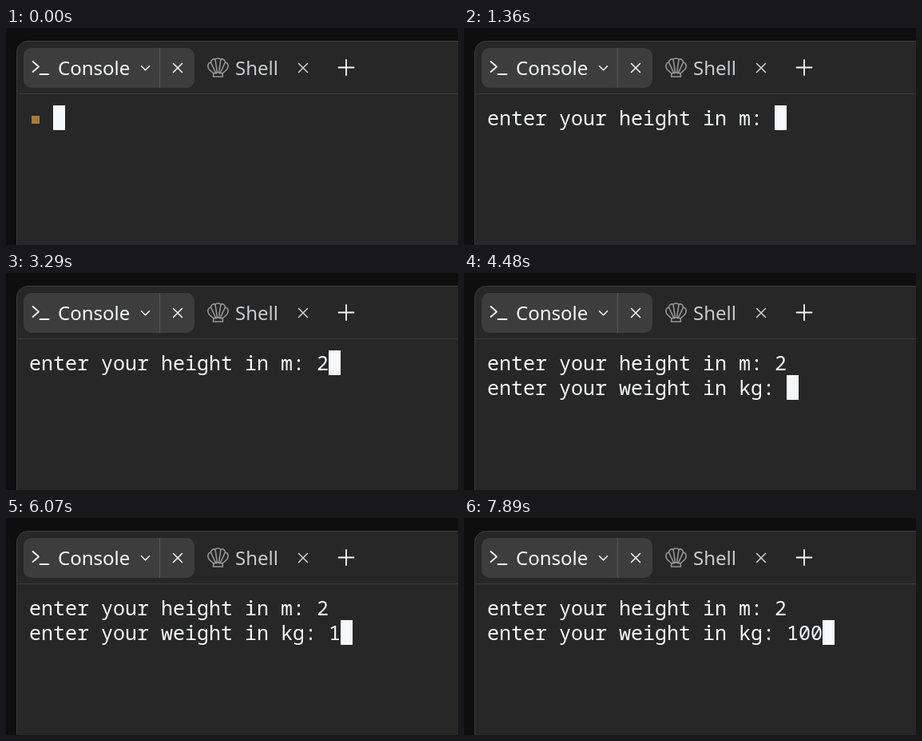
Animation of 566x272 px, one loop 8000 ms. Source, as an HTML page:

```html
<!DOCTYPE html>
<html lang="en">
<head>
<meta charset="utf-8">
<title>Console</title>
<style>
  html, body { margin: 0; width: 100%; height: 100%; overflow: hidden; background: #0e0e0e; }
  svg { display: block; }
  .tab { font: 24px "Noto Sans", "Open Sans", sans-serif; }
  .term { font: 25px "Noto Sans Mono", "DejaVu Sans Mono", monospace; fill: #f5f9fc; white-space: pre; }
  .line { fill: none; stroke-linecap: round; stroke-linejoin: round; }
</style>
</head>
<body>
<svg width="566" height="272" viewBox="0 0 566 272">
  <rect x="13.5" y="16.5" width="580" height="300" rx="14" fill="#272727" stroke="#3c3c3c"/>
  <path d="M14 82.5H566" stroke="#3b3b3b"/>

  <rect x="22" y="25" width="214" height="50" rx="10" fill="#3d3d3d"/>
  <path d="M192.5 25V75" stroke="#545454"/>
  <g class="line" stroke="#f5f9fc" stroke-width="1.8">
    <path d="M33.5 42L41 48.5L33.5 55M42.5 58H53.5"/>
    <path d="M169.5 47.8L174.5 52.8L179.5 47.8" stroke-width="1.5"/>
    <path d="M209.5 44.5L220.5 55.5M220.5 44.5L209.5 55.5" stroke-width="1.5"/>
    <path d="M416.5 49.5H435.5M426 40V59"/>
  </g>
  <path class="line" d="M366.500 44.500L377.500 55.500M377.500 44.500L366.500 55.500" stroke="#d0d3d6" stroke-width="1.5"/>
  <text class="tab" x="65" y="59" fill="#f5f9fc">Console</text>
  <text class="tab" x="287" y="59" fill="#c8ccd0">Shell</text>

  <g class="line" stroke="#979797" stroke-width="1.6">
    <path d="M260 57L254.500 52C251.500 48 253 43.500 256.500 43C257 39.500 260 38 262 39.500C263.500 37.500 267.500 37.500 269 39.500C271.500 38 274 39.500 274.500 43C278 43.500 279.500 48 276.500 52L271 57"/>
    <path d="M256.500 43L263 57M262 39.500L264.500 56M269 39.500L266.500 56M274.500 43L268 57"/>
    <path d="M260 57L259.500 61H271.500L271 57C268 55.500 263 55.500 260 57Z"/>
  </g>

  <rect id="prompt" x="32" y="110" width="10" height="10" fill="#a97b38"/>
  <text class="term" x="29" y="122" id="row0"></text>
  <text class="term" x="29" y="153" id="row1"></text>
  <rect id="cursor" width="15" height="31" fill="#f5f9fc"/>
</svg>
<script>
  const LOOP = 8000, CELL = 15, ROW = 31, LEFT = 29, TOP = 97;
  const HEIGHT = "enter your height in m: ";
  const WEIGHT = "enter your weight in kg: ";
  const $ = id => document.getElementById(id);
  const prompt = $("prompt"), cursor = $("cursor"), rows = [$("row0"), $("row1")];

  // Each step: start time, then the terminal lines; the cursor follows the last one.
  const steps = [
    [0, "  "],
    [1290, ""],
    [1360, HEIGHT],
    [3290, HEIGHT + "2"],
    [4410, HEIGHT + "2", ""],
    [4480, HEIGHT + "2", WEIGHT],
    [6070, HEIGHT + "2", WEIGHT + "1"],
    [7130, HEIGHT + "2", WEIGHT + "10"],
    [7890, HEIGHT + "2", WEIGHT + "100"]
  ];
  let shown;

  function render(time) {
    const step = steps.findLast(([start]) => start <= time);
    if (step === shown) return;
    shown = step;
    const lines = step.slice(1), last = lines.length - 1;
    rows.forEach((row, i) => { row.textContent = lines[i] || ""; });
    prompt.style.display = step === steps[0] ? "" : "none";
    cursor.setAttribute("x", LEFT + lines[last].length * CELL);
    cursor.setAttribute("y", TOP + last * ROW);
  }

  const origin = performance.now();
  function tick() {
    render((performance.now() - origin) % LOOP);
    requestAnimationFrame(tick);
  }
  render(0);
  requestAnimationFrame(tick);
</script>
</body>
</html>
```
